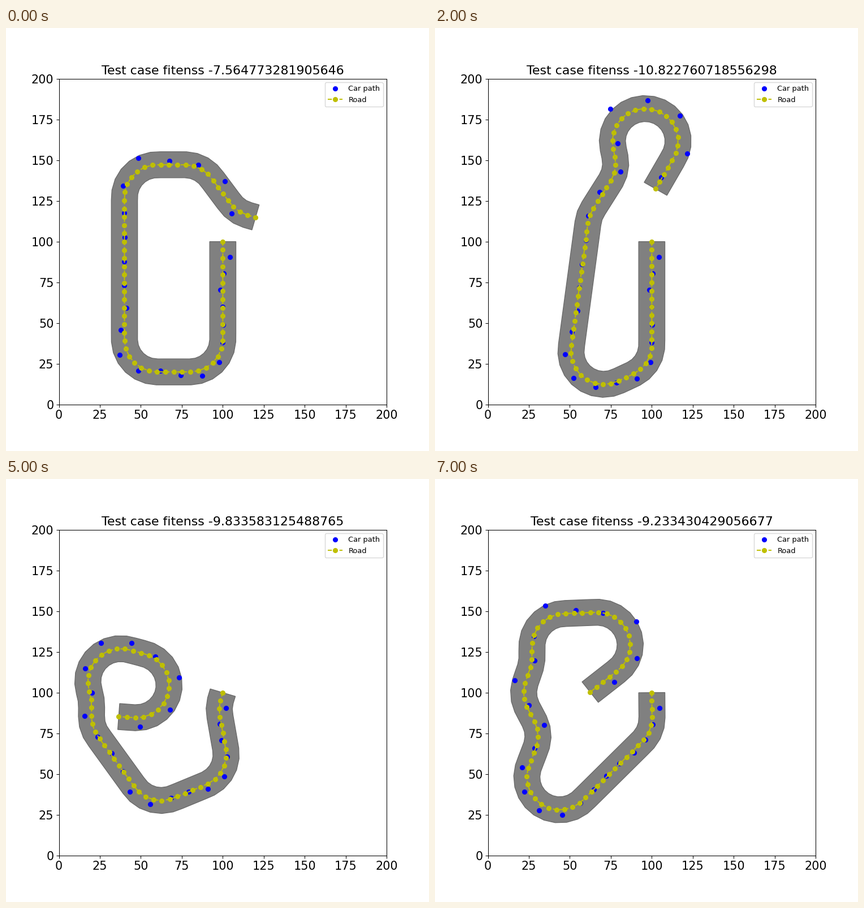
Animation of 748x748 px, one loop 8 s. Source, as a matplotlib script:

```python
import numpy as np
import matplotlib.pyplot as plt
from matplotlib.animation import FuncAnimation

# All lengths are in map units.
RADIUS = 20         # every bend of the road
HALF_WIDTH = 8
DOT_GAP = 5.05
FINE = 0.5          # sampling step for the car's drift
STEP_MS = 1000

# Fitness text and the corners of each road before rounding.
TESTS = [
    ("-7.564773281905646",
     [(100, 100), (100, 20), (40, 20), (40, 147.2), (87, 147.2),
      (108.5, 118.2), (120, 114.9)]),
    ("-8.917264305518273",
     [(100, 100), (100, 14.3), (46, 14.3), (50, 110), (66, 160),
      (112, 170), (112, 128)]),
    ("-10.822760718556298",
     [(100, 100), (100, 24), (46, -1.3), (61.7, 116.2), (79.2, 144.1),
      (70.4, 186), (127.9, 176.9), (102.3, 132.4)]),
    ("-11.477176327046342",
     [(100, 100), (98.7, 90.4), (108.3, 68.8), (108.3, 30.3), (55.2, 41),
      (17.8, 95.4), (93.5, 118.8), (112, 132.1), (128.3, 141),
      (149.1, 168.7), (181, 133.2), (134.1, 104.4), (115.5, 111.8)]),
    ("-10.796800224026645",
     [(100, 100), (98.2, 87), (112.5, 70.6), (125.3, 62.2), (145, 27.9),
      (103, 10.4), (73, 117.4), (85.5, 137.5), (96.3, 166.6),
      (133.7, 160.6), (157.6, 146.4), (176.6, 155.9)]),
    ("-9.833583125488765",
     [(100, 100), (97.3, 91), (104.5, 49.6), (55.4, 29.2), (19.8, 78.7),
      (20, 94.5), (10.6, 134.9), (70, 119.1), (64, 83.3), (36.5, 85.3)]),
    ("-10.312485760193842",
     [(100, 100), (102, 60), (75, 15.6), (28, 15.6), (24, 75), (30, 140),
      (80, 136), (78, 95)]),
    ("-9.233430429056677",
     [(100, 100), (100.2, 76), (46.4, 22.4), (19.3, 40.1), (32.5, 74.6),
      (20.1, 98.2), (26.9, 118.2), (26.9, 147.8), (80.7, 149.9),
      (90.6, 122.5), (62.4, 100.3)]),
]


def unit(z):
    return z / np.abs(z)


def round_corners(corners):
    """Replace each corner by a circular arc; points are complex numbers."""
    pts = [complex(x, y) for x, y in corners]
    path = [pts[0]]
    for a, b, c in zip(pts, pts[1:], pts[2:]):
        u, v = unit(b - a), unit(c - b)
        turn = np.angle(v / u)
        start = b - u * RADIUS * np.tan(abs(turn) / 2)
        t = np.linspace(0, abs(turn), 40)
        bend = np.sin(t) + 1j * np.sign(turn) * (1 - np.cos(t))
        path.extend(start + u * RADIUS * bend)
    path.append(pts[-1])
    return np.array(path)


def resample(path, gap):
    """Evenly spaced points along the path, both ends included."""
    s = np.append(0, np.cumsum(np.abs(np.diff(path))))
    at = np.linspace(0, s[-1], round(s[-1] / gap) + 1)
    return np.interp(at, s, path.real) + 1j * np.interp(at, s, path.imag)


def drive(path):
    """Car positions: a damped sway, kicked at the start and by each bend."""
    fine = resample(path, FINE)
    s = FINE * np.arange(len(fine))
    ahead = unit(np.gradient(fine))
    curvature = np.gradient(np.unwrap(np.angle(ahead)), FINE)
    sway = np.exp(-s / 17) * np.sin(0.15 * s)
    push = (6 + 0.05 * s) * curvature * FINE
    drift = 8 * sway - np.convolve(push, sway)[:len(s)]
    track = fine + 1j * ahead * drift
    stops = 359 * (1.027 ** np.arange(1, 40) - 1)   # the car speeds up
    stops = stops[stops < s[-1]]
    return track[(stops / FINE).astype(int)]


def outline(dots):
    """Flat-capped band around the centre line."""
    side = 1j * HALF_WIDTH * unit(np.gradient(dots))
    edge = np.concatenate([dots + side, (dots - side)[::-1]])
    return np.column_stack([edge.real, edge.imag])


def build(fitness, corners):
    path = round_corners(corners)
    return fitness, resample(path, DOT_GAP), drive(path)


scenes = [build(*test) for test in TESTS]

fig, ax = plt.subplots(figsize=(8, 8), dpi=93.5)
band = plt.Polygon(outline(scenes[0][1]), fc="gray", ec="dimgray")
ax.add_patch(band)
car_line, = ax.plot([], [], "bo", label="Car path")
road_line, = ax.plot([], [], "yo--", label="Road")
title = ax.set_title("", fontsize=17)
ticks = np.arange(0, 201, 25)
ax.set(xlim=(0, 200), ylim=(0, 200), xticks=ticks, yticks=ticks)
ax.tick_params(axis="both", labelsize=16)
ax.legend(loc="upper right")


def draw(i):
    fitness, dots, car = scenes[i]
    band.set_xy(outline(dots))
    car_line.set_data(car.real, car.imag)
    road_line.set_data(dots.real, dots.imag)
    title.set_text("Test case fitenss " + fitness)
    return band, car_line, road_line, title


anim = FuncAnimation(fig, draw, frames=len(scenes), interval=STEP_MS,
                     repeat=True, repeat_delay=0)
plt.show()
```
